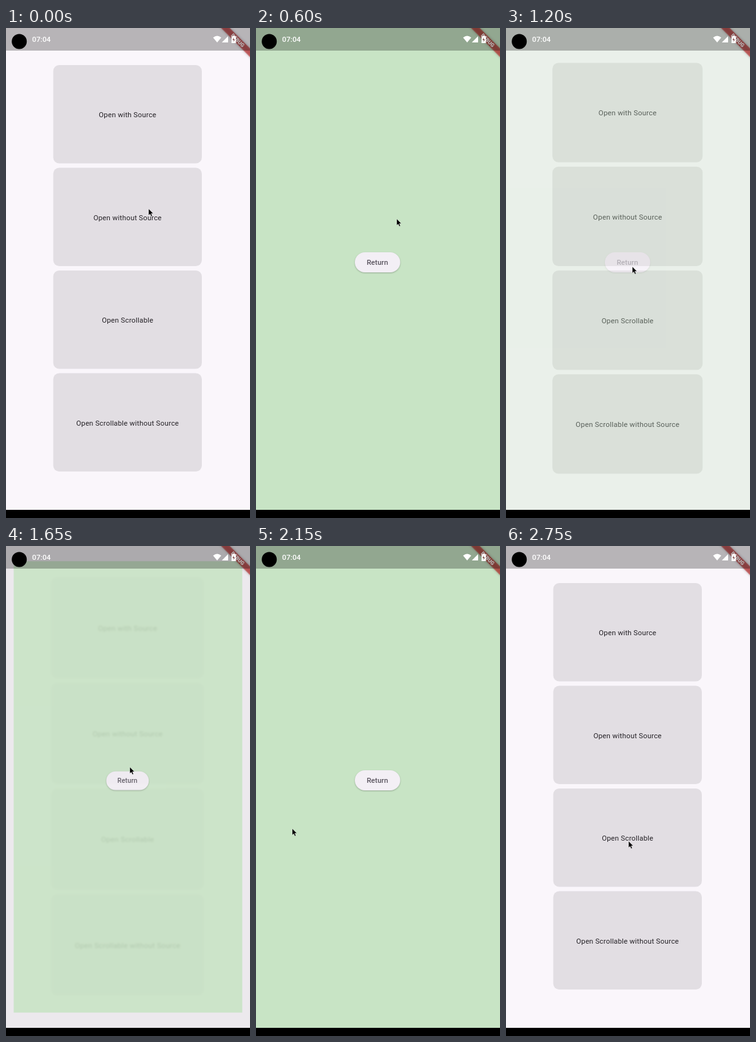
Animation, 390 px wide and 780 px high, one loop 2800 ms. Source, as an HTML page:

```html
<!DOCTYPE html>
<html lang="en">
<head>
<meta charset="utf-8">
<style>
  html, body { margin: 0; width: 100%; height: 100%; overflow: hidden; background: #000; }
  svg { display: block; width: 390px; height: 780px; }
  text { font: 11.4px Roboto, sans-serif; text-anchor: middle; }
  #cards text { fill: #242126; letter-spacing: .2px; }
  #page text { font-weight: 500; fill: #58535d; letter-spacing: .08px; }
  #pill { filter: drop-shadow(0 1px 1px rgba(0, 0, 0, .25)); }
  #banner rect { filter: drop-shadow(0 0 2px rgba(0, 0, 0, .4)); }
</style>
</head>
<body>
<svg viewBox="0 0 390 780">
  <defs><clipPath id="screen"><rect width="390" height="767"/></clipPath></defs>
  <g clip-path="url(#screen)">
    <rect width="390" height="767" fill="#faf6fb"/>
    <g id="cards"></g>
    <rect id="dim" width="390" height="767"/>
    <g id="page">
      <rect width="390" height="767" fill="#c8e4c5"/>
      <rect id="pill" x="158" y="357" width="72.5" height="32" rx="16" fill="#f3eff5"/>
      <text x="194" y="377">Return</text>
    </g>
    <g id="banner" transform="translate(390 0) rotate(45)">
      <rect x="-40" y="22.8" width="80" height="9.8" fill="#b71c1c" fill-opacity=".63"/>
      <text y="30.7" fill="#fff" style="font-size:8.3px;font-weight:900">DEBUG</text>
    </g>
  </g>
  <rect width="390" height="36" fill-opacity=".27"/>
  <circle cx="21.2" cy="21.5" r="12"/>
  <g fill="#fff">
    <text x="56.6" y="22" style="font-size:11.7px;font-weight:500">07:04</text>
    <path d="M331 15.2Q337.500 10 344 15.200L337.500 23Z"/>
    <path d="M345 23L355 13V23Z"/>
    <path fill-rule="evenodd" d="M360.500 13.300H362.500V12H365.500V13.300H367.500V24H360.500ZM364.500 14.500L362 19H363.600V22.500L366 18H364.500Z"/>
  </g>
  <path id="cursor" d="M0 0V10L2.300 8L4.100 11.700L5.700 11L4 7.300H7.200Z" stroke="#fff" stroke-opacity=".55" stroke-width=".6"/>
</svg>
<script>
const LOOP = 2800, STEP = 50;
const byId = id => document.getElementById(id);
const [cards, dim, page, cursor] = ["cards", "dim", "page", "cursor"].map(byId);

cards.innerHTML = ["Open with Source", "Open without Source", "Open Scrollable", "Open Scrollable without Source"]
  .map((label, i) => {
    const y = 59 + i * 163.5;
    return `<rect x="75.500" y="${y}" width="237.500" height="156.500" rx="9.500" fill="#e2dee3"/>
      <text x="194.300" y="${y + 83}">${label}</text>`;
  }).join("");

// time, x, y
const cursorPath = [
  [0, 228, 288], [150, 228, 290], [600, 225, 304], [1050, 202, 380], [1200, 202, 380],
  [1450, 198, 352], [1650, 198, 352], [1900, 130, 390], [2100, 58, 450], [2150, 58, 450],
  [2350, 365, 675], [2400, 365, 675], [2700, 224, 511], [2750, 196, 470]
];

const ramp = (t, from, to) => Math.min(1, Math.max(0, (t - from) / (to - from)));
const easeOut = u => 1 - (1 - u) ** 3;

function cursorAt(t) {
  const i = Math.max(1, cursorPath.findIndex(k => k[0] >= t));
  const [t0, x0, y0] = cursorPath[i - 1], [t1, x1, y1] = cursorPath[i];
  const u = ramp(t, t0, t1);
  return [x0 + (x1 - x0) * u, y0 + (y1 - y0) * u];
}

const zoom = s => `translate(194.500 383) scale(${s}) translate(-194.500 -383)`;

function draw(t) {
  const second = t >= 1500;
  const [openAt, closeAt] = second ? [1600, 2350] : [50, 1100];
  const opening = t < closeAt;
  const p = opening ? easeOut(ramp(t, openAt, openAt + 200))
                    : 1 - easeOut(ramp(t, closeAt, closeAt + 250));
  const drag = ramp(t, 2150, 2350);

  cards.setAttribute("transform", zoom(1 + .05 * p));
  cards.style.filter = p ? `blur(${3 * p}px)` : "none";
  dim.setAttribute("opacity", opening ? .22 * p * (1 - p) : 0);
  page.setAttribute("opacity", Math.min(1, 1.5 * p) * (1 - .32 * drag));
  page.setAttribute("transform",
    `translate(${307 * drag} ${225 * drag}) ${zoom(opening ? .85 + .15 * p : 1)}`);
  cursor.setAttribute("transform", `translate(${cursorAt(t)})`);
}

const start = performance.now();
function tick() {
  const t = (performance.now() - start) % LOOP;
  draw(Math.floor(t / STEP) * STEP);
  requestAnimationFrame(tick);
}
tick();
</script>
</body>
</html>
```
